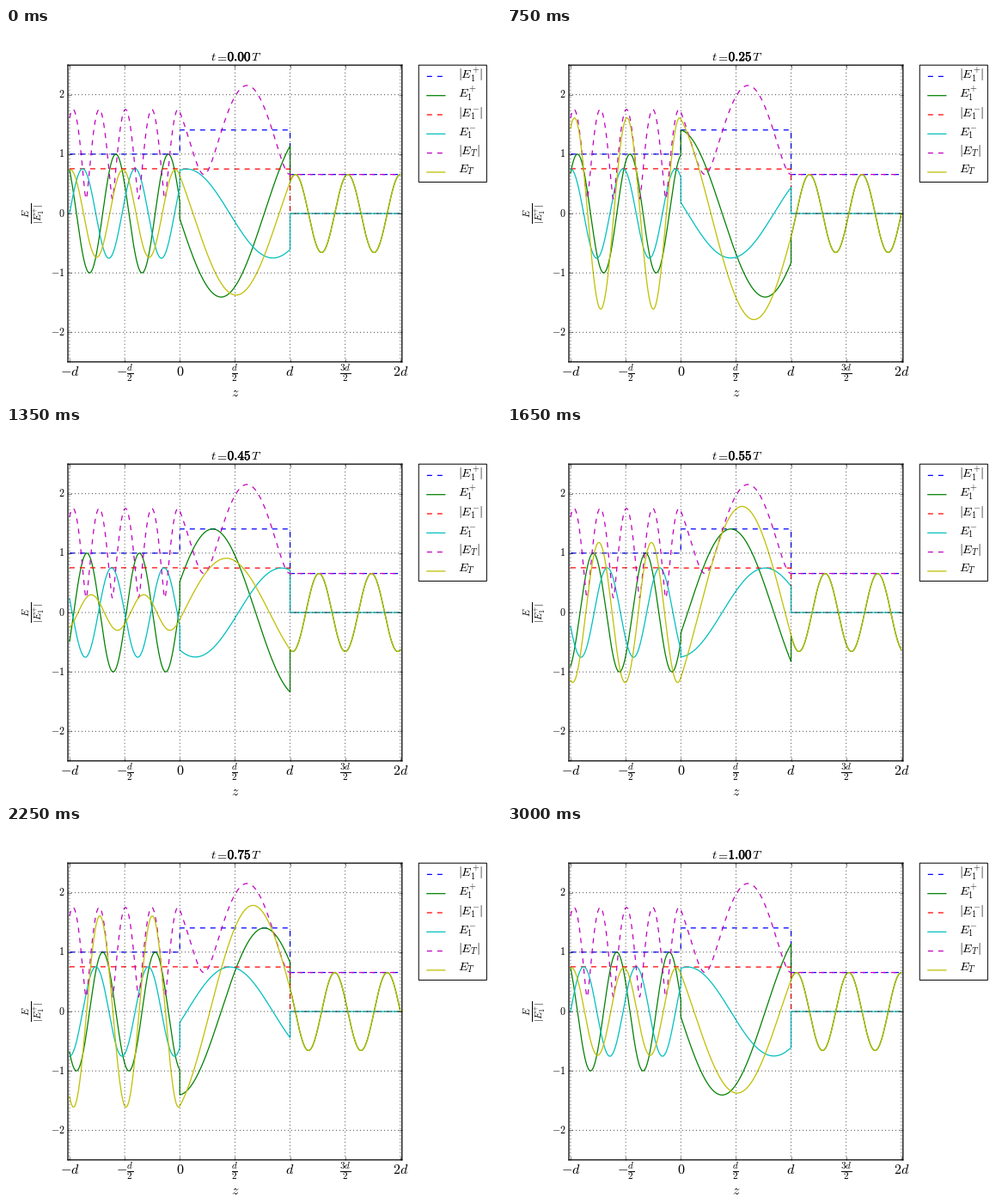
A matplotlib script for the animation above (3150 ms loop, 576 by 432 pixels).

```python
import numpy as np
import matplotlib.pyplot as plt
from matplotlib.animation import FuncAnimation
from matplotlib.lines import Line2D
from matplotlib.patches import Rectangle
from matplotlib.patheffects import withStroke

W, H, DPI = 576, 432, 72
FRAMES, INTERVAL = 21, 150
LINE = 1.25

plt.style.use("classic")
plt.rcParams.update({
    "mathtext.fontset": "cm",
    "toolbar": "None",
    "path.snap": False,
    "lines.linewidth": LINE,
    "lines.dashed_pattern": (6, 6),
    "lines.scale_dashes": False,
    "axes.linewidth": LINE,
    "grid.linewidth": 0.7,
})

# Slab between two identical media; lengths in units of d.
K1 = 2 * np.pi * 2.1
K2 = 2 * np.pi * 0.64
RATIO = K1 / K2
PHASE = 0.2 * np.pi


def fields():
    """Complex amplitudes of the forward and backward waves along z."""
    out = 1 / abs(np.cos(K2) + 0.5j * (RATIO + 1 / RATIO) * np.sin(K2))
    out = out * np.exp(1j * PHASE)
    fwd2 = out * (1 + RATIO) / 2
    bwd2 = out * (1 - RATIO) / 2
    a, b = fwd2 * np.exp(1j * K2), bwd2 * np.exp(-1j * K2)
    total, diff = a + b, (a - b) / RATIO
    fwd1, bwd1 = (total + diff) / 2, (total - diff) / 2

    z1, z2, z3 = (np.linspace(s, s + 1, 500) for s in (-1, 0, 1))
    fwd = [fwd1 * np.exp(-1j * K1 * z1),
           fwd2 * np.exp(-1j * K2 * (z2 - 1)),
           out * np.exp(-1j * K1 * (z3 - 1))]
    bwd = [bwd1 * np.exp(1j * K1 * z1),
           bwd2 * np.exp(1j * K2 * (z2 - 1)),
           0j * z3]
    return tuple(np.concatenate(p) for p in ([z1, z2, z3], fwd, bwd))


z, fwd, bwd = fields()
waves = [fwd, bwd, fwd + bwd]

fig = plt.figure(figsize=(W / DPI, H / DPI), dpi=DPI, facecolor="white")
ax = fig.add_axes([0.125, 0.1, 0.675, 0.8])
ax.set_xlim(-1.015, 2.015)
ax.set_ylim(-2.5, 2.5)
ax.set_xticks(np.arange(-1, 2.1, 0.5))
ax.set_yticks(range(-2, 3))
ax.tick_params(labelbottom=False, labelleft=False)
ax.grid(True)


def label(x, y, s, size, ha="center", va="baseline", **kw):
    return fig.text(x / W, 1 - y / H, f"${s}$", fontsize=size,
                    ha=ha, va=va, **kw)


def to_px(x, y):
    return 72 + (x + 1.015) / 3.03 * 388.8, 216 - y * 69.12


ticks = ["-d", r"-\frac{d}{2}", "0", r"\frac{d}{2}", "d", r"\frac{3d}{2}", "2d"]
for i, s in enumerate(ticks):
    label(to_px(-1 + i / 2, 0)[0], 404.8, s, 16)
for v in range(-2, 3):
    label(68.3, to_px(0, v)[1] + 3.6, str(v), 12, ha="right")
label(266.5, 429, "z", 16)
label(32.5, 216, r"\frac{E}{|E_{1}^{+}|}", 16, va="center", rotation=90)

label(237.5, 38.2, "t", 14.4, ha="left")
label(250.8, 38.2, "=", 14.4)
clock = label(271.7, 38.2, r"\mathbf{0.00}", 15.2,
              path_effects=[withStroke(linewidth=0.5, foreground="black")])
label(284.8, 38.2, "T", 14.4, ha="left")

fig.add_artist(Rectangle((480.24 / W, 1 - 179.4 / H), 79.1 / W, 136.2 / H,
                         fc="white", ec="black", lw=1))
names = ["E_{1}^{+}", "E_{1}^{-}", "E_{T}"]
moving = []
row = 0
for wave, name, (env_col, col) in zip(waves, names, ("bg", "rc", "my")):
    ax.plot(z, abs(wave), env_col + "--")
    moving.append(ax.plot(z, wave.real, col)[0])
    for color, style, s in ((env_col, "--", f"|{name}|"), (col, "-", name)):
        y = 56.4 + 22.3 * row
        fig.add_artist(Line2D([489.8 / W, 510.8 / W], [1 - y / H] * 2,
                              color=color, ls=style))
        label(525.5, 59.5 + 21.8 * row, s, 14.4, ha="left")
        row += 1


def update(i):
    t = i / (FRAMES - 1)
    turn = np.exp(2j * np.pi * t)
    for line, wave in zip(moving, waves):
        line.set_ydata((wave * turn).real)
    clock.set_text(rf"$\mathbf{{{t:.2f}}}$")
    return moving + [clock]


anim = FuncAnimation(fig, update, frames=FRAMES, interval=INTERVAL,
                     repeat=True, repeat_delay=0, blit=False)
plt.show()
```
